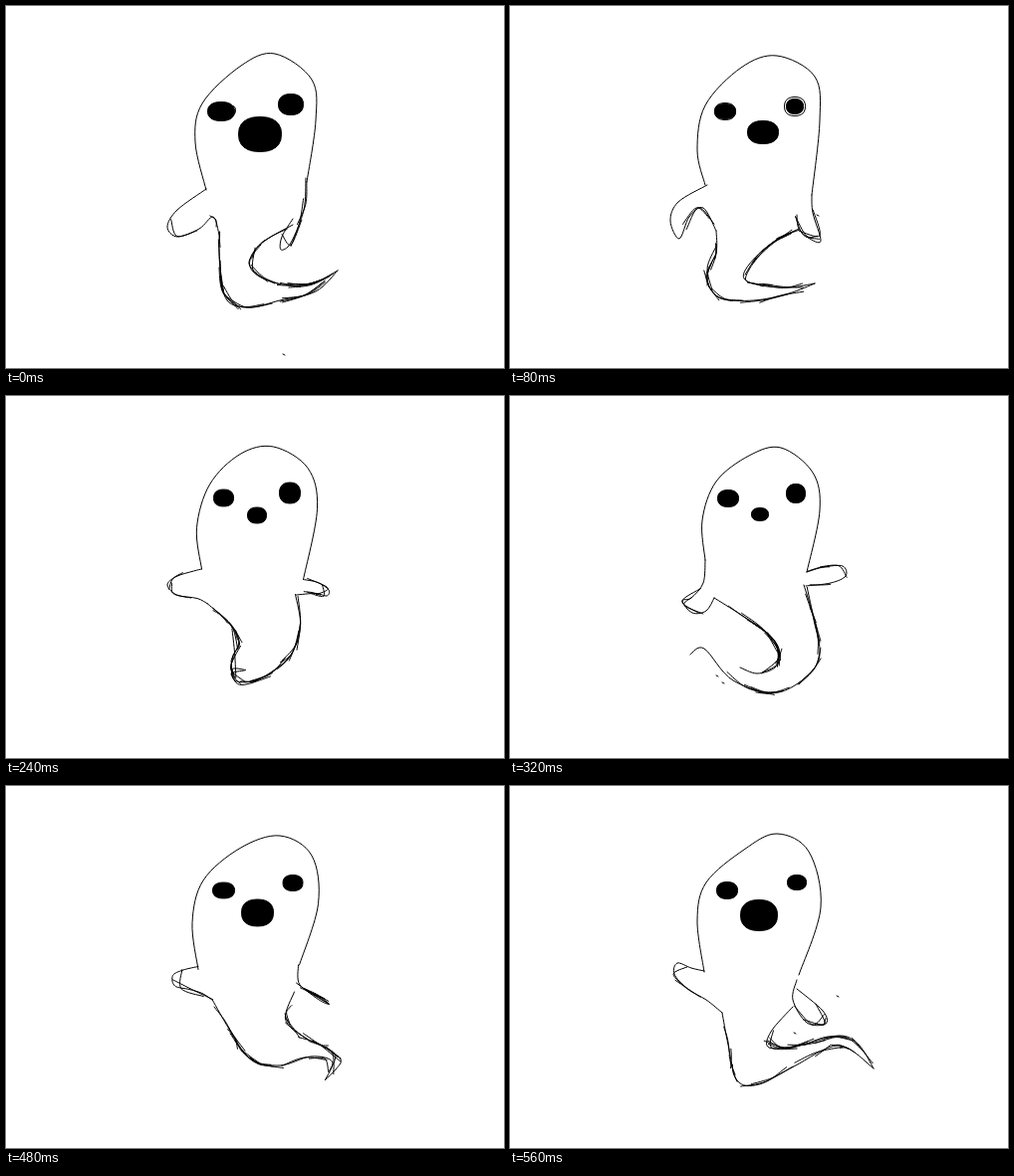
An HTML page that plays this animation: 500x364 px, repeating every 0.64 s.

```html
<!DOCTYPE html>
<html lang="en">
<head>
<meta charset="utf-8">
<title>Ghost</title>
<style>
  html, body { margin: 0; width: 100%; height: 100%; overflow: hidden; background: #fff; }
  svg { display: block; width: 100vw; height: 100vh; }
  path { fill: none; stroke: #000; stroke-width: 1; stroke-linecap: round; }
  .blob { fill: #000; }
  .pose { visibility: hidden; animation: show 640ms step-end infinite; animation-delay: calc((var(--i) - 8) * 80ms); }
  @keyframes show {
    0% { visibility: visible; }
    12.5%, 100% { visibility: hidden; }
  }
</style>
</head>
<body>
<svg id="stage" viewBox="0 0 500 364"></svg>
<script>
const stage = document.getElementById('stage');
const outlines = ['head', 'leftArm', 'rightArm', 'back', 'belly'];
const ovals = ['leftEye', 'rightEye', 'mouth'];
// Loose pen passes per outline
const passes = { head: 0, leftArm: 2, rightArm: 3, back: 10, belly: 10 };

let seed = 7;
const random = () => (seed = seed * 16807 % 2147483647) / 2147483647;
const jitter = size => (random() - 0.5) * 2 * size;

// Outlines are "x,y" key points; ovals and rings are "centre radii"
const parse = text => text.split(' ').map(pair => pair.split(',').map(Number));
const read = pose => Object.fromEntries(Object.entries(pose).map(([part, text]) => [part, parse(text)]));

function between(a, b) {
  const middle = (p, i, other) => p.map((v, k) => (v + other[i][k]) / 2);
  return Object.fromEntries([...outlines, ...ovals].map(part =>
    [part, a[part].map((p, i) => middle(p, i, b[part]))]));
}

// Smooth spline through the points
function curve(points) {
  let d = 'M' + points[0];
  for (let i = 0; i < points.length - 1; i++) {
    const b = points[i], c = points[i + 1];
    const a = points[i - 1] || b, e = points[i + 2] || c;
    const c1 = b.map((v, k) => v + (c[k] - a[k]) / 6);
    const c2 = c.map((v, k) => v - (e[k] - b[k]) / 6);
    d += `C${c1} ${c2} ${c}`;
  }
  return d;
}

// Oval with slightly flattened sides
function oval([[x, y], [rx, ry]]) {
  const flat = v => Math.sign(v) * Math.abs(v) ** 0.85;
  const points = Array.from({ length: 24 }, (_, k) => {
    const t = k * Math.PI / 12;
    return [x + (rx - 0.5) * flat(Math.cos(t)), y + (ry - 0.5) * flat(Math.sin(t))];
  });
  return 'M' + points.join('L') + 'Z';
}

function addPath(group, d, className = 'line') {
  const path = document.createElementNS('http://www.w3.org/2000/svg', 'path');
  path.setAttribute('class', className);
  path.setAttribute('d', d);
  return group.appendChild(path);
}

// Retraces part of a line with a short, slightly stray stroke
function retrace(group, line) {
  const total = line.getTotalLength();
  const length = 12 + random() * 45;
  const start = random() * (total - length);
  const points = [0, 0.5, 1].map(part => {
    const { x, y } = line.getPointAtLength(start + length * part);
    const stray = part === 0.5 ? 1 : 2.6;
    return [x + jitter(stray), y + jitter(stray)];
  });
  addPath(group, curve(points));
}

function draw(pose, index) {
  const group = document.createElementNS('http://www.w3.org/2000/svg', 'g');
  group.setAttribute('class', 'pose');
  group.style.setProperty('--i', index);
  stage.appendChild(group);
  for (const part of outlines) {
    const line = addPath(group, curve(pose[part]));
    for (let n = 0; n < passes[part]; n++) retrace(group, line);
  }
  for (const part of ovals) addPath(group, oval(pose[part]), 'blob');
  const rings = pose.rings || [];
  for (let n = 0; n < rings.length; n += 2) addPath(group, oval(rings.slice(n, n + 2)));
  for (const speck of pose.specks || []) addPath(group, `M${speck}l2 1`);
}

const hover = read({
  leftEye: '216,106 14,10', rightEye: '286,99 13,11', mouth: '255,129 22,18',
  head: '201,185 190,137 197,98 236,60 270,48 307,74 311,115 302,177',
  leftArm: '201,184 172,205 162,222 172,232 194,224 208,212 214,230',
  rightArm: '301,173 299,205 286,238 276,245 277,232 288,214',
  back: '214,228 215,265 222,296 245,303 275,296 311,287 333,266',
  belly: '288,220 260,236 246,252 248,267 273,279 305,280 333,266',
  rings: '227,105 4,5', specks: '278,350'
});
const sink = read({
  leftEye: '216,106 11,8', rightEye: '286,101 9,8', mouth: '254,127 16,12',
  head: '196,180 188,145 196,100 232,62 268,50 306,71 311,115 303,190',
  leftArm: '198,180 169,197 161,216 170,234 180,212 194,203 207,226',
  rightArm: '303,190 304,208 312,236 301,234 290,224 288,210',
  back: '207,226 207,248 197,272 210,293 245,296 280,289 306,279',
  belly: '290,224 262,239 240,260 235,274 252,281 280,283 306,279',
  rings: '216,106 11,9 286,101 11,10', specks: '308,210'
});
const wave = read({
  leftEye: '218,102 10,9', rightEye: '283,97 12,12', mouth: '253,121 11,10',
  head: '197,183 190,140 202,92 230,57 265,50 302,68 314,112 299,192',
  leftArm: '197,183 183,164 160,160 151,174 160,182 187,191 200,215',
  rightArm: '299,192 311,203 314,219 307,221 300,209 286,209',
  back: '200,215 217,238 211,259 184,266 188,287 225,302 300,291',
  belly: '286,209 286,240 258,259 237,272 237,287 260,295 300,291'
});
const curl = read({
  leftEye: '219,103 11,9', rightEye: '287,98 10,10', mouth: '251,119 9,7',
  head: '196,165 193,125 207,86 240,60 272,52 304,77 311,115 298,177',
  leftArm: '196,165 194,188 182,203 173,206 183,218 197,216 205,203',
  rightArm: '298,177 315,172 334,171 337,181 322,188 297,191',
  back: '205,203 232,220 258,238 271,258 266,273 248,279 231,273',
  belly: '295,190 305,225 309,268 270,298 224,286 195,254 181,260',
  specks: '207,281 213,288'
});
const swing = read({
  leftEye: '219,105 12,8', rightEye: '288,98 11,9', mouth: '255,125 14,12',
  head: '191,182 186,140 199,93 235,61 282,52 314,74 315,115 299,170',
  leftArm: '191,177 174,187 167,203 174,213 190,205 197,202 202,203',
  rightArm: '299,165 306,185 334,187 332,200 313,203 295,192',
  back: '202,203 230,230 262,252 300,262 327,262 325,293 276,307',
  belly: '295,192 299,221 335,240 353,266 342,299 312,310 276,307'
});
const rise = read({
  leftEye: '218,105 11,9', rightEye: '288,97 10,8', mouth: '250,130 19,16',
  head: '195,187 188,135 197,97 235,64 268,48 300,66 312,122 290,190',
  leftArm: '195,186 182,183 168,178 165,189 178,204 197,215 213,228',
  rightArm: '288,195 284,215 298,238 317,239 314,226 288,204',
  back: '213,228 219,260 228,296 250,300 285,282 330,261 365,284',
  belly: '284,222 262,247 260,263 290,261 330,251 350,260 365,284',
  specks: '328,211 285,248'
});

[hover, sink, wave, between(wave, curl), curl, swing, between(swing, rise), rise].forEach(draw);
</script>
</body>
</html>
```
